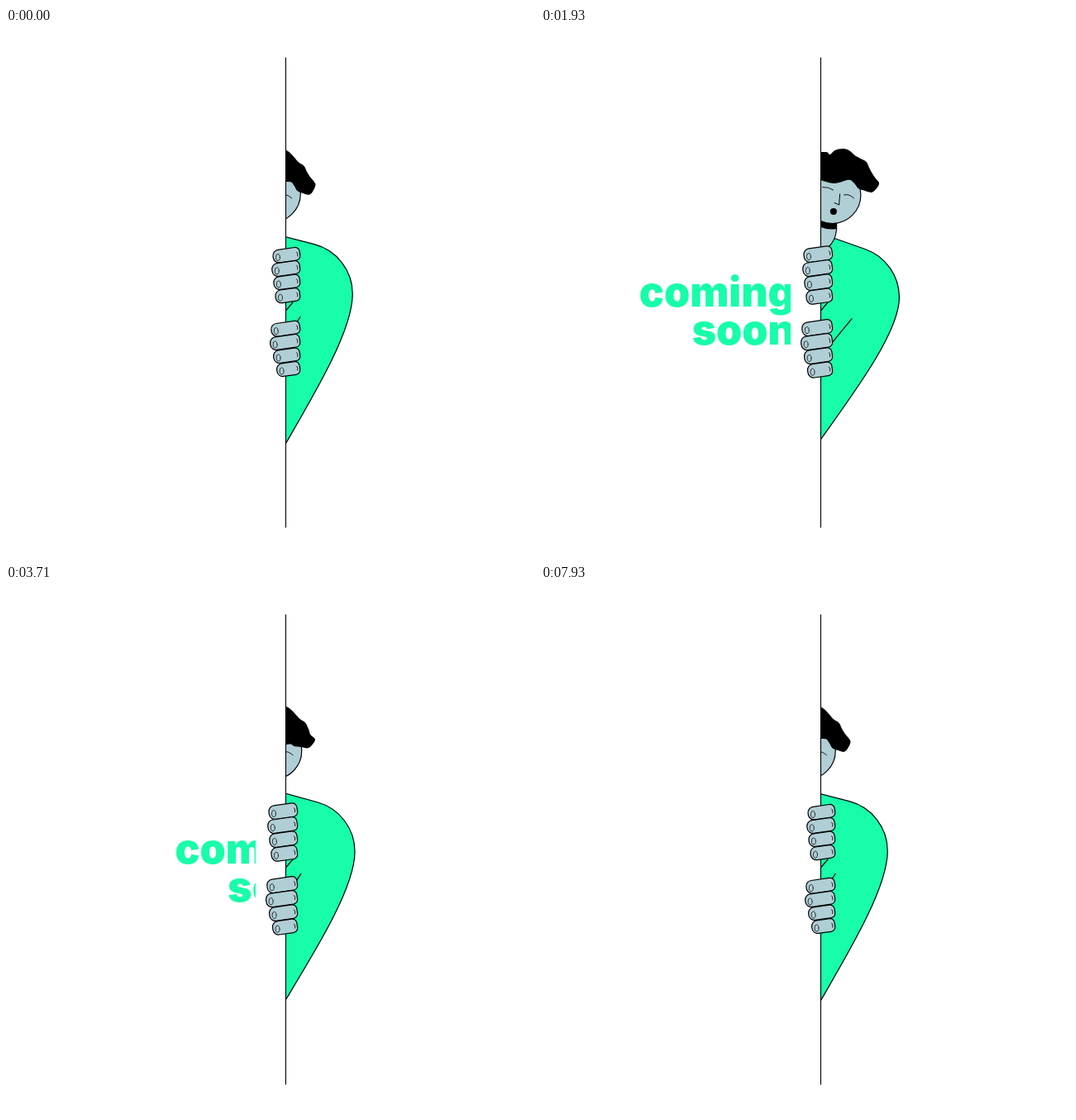
These frames come from a looping animation (640 by 640 pixels, 8 s). An HTML page with a canvas:

```html
<!DOCTYPE html>
<html lang="en">
<head>
<meta charset="utf-8">
<title>coming soon</title>
<style>
html, body { margin: 0; width: 100%; height: 100%; overflow: hidden; background: #fff; }
canvas { display: block; width: 640px; height: 640px; }
</style>
</head>
<body>
<canvas id="stage" width="640" height="640"></canvas>
<script>
const ctx = document.getElementById('stage').getContext('2d');
const LOOP = 8000, STEPS = 112, WALL = 338.5;
const GREEN = '#17fda9', SKIN = '#b0ced5', INK = '#000';

const lerp = (a, b, u) => a + (b - a) * u;

// Sine ease from 0 to 1 between two times
function ease(t, from, to) {
  const u = Math.min(1, Math.max(0, (t - from) / (to - from)));
  return (1 - Math.cos(Math.PI * u)) / 2;
}

// Rises at the start of the loop, falls between two later times
const pulse = (t, from, to) => ease(t, 0, 1245) * (1 - ease(t, from, to));

// Smooth curve through points
function spline(pts) {
  const at = i => pts[Math.min(pts.length - 1, Math.max(0, i))];
  ctx.moveTo(...pts[0]);
  for (let i = 0; i < pts.length - 1; i++) {
    const [p, a, b, n] = [at(i - 1), at(i), at(i + 1), at(i + 2)];
    ctx.bezierCurveTo(a[0] + (b[0] - p[0]) / 6, a[1] + (b[1] - p[1]) / 6,
      b[0] - (n[0] - a[0]) / 6, b[1] - (n[1] - a[1]) / 6, b[0], b[1]);
  }
}

function fill(color) {
  ctx.fillStyle = color;
  ctx.fill();
}

function stroke(width = 1.2) {
  ctx.lineWidth = width;
  ctx.strokeStyle = INK;
  ctx.stroke();
}

function line(x1, y1, x2, y2, width) {
  ctx.beginPath();
  ctx.moveTo(x1, y1);
  ctx.lineTo(x2, y2);
  stroke(width);
}

function curve(x1, y1, cx, cy, x2, y2, width) {
  ctx.beginPath();
  ctx.moveTo(x1, y1);
  ctx.quadraticCurveTo(cx, cy, x2, y2);
  stroke(width);
}

function drawBody(b) {
  const side = lerp(419.3, 434.8, b), hem = lerp(503, 497.5, b);
  const outline = () => {
    ctx.beginPath();
    ctx.moveTo(lerp(332, 355, b), lerp(251, 254, b));
    ctx.arcTo(side, lerp(273.8, 282.8, b), side, 400, 62);
    ctx.bezierCurveTo(side, lerp(365, 367, b), lerp(376, 383, b), lerp(438, 436, b), 338.3, hem);
  };
  outline();
  ctx.lineTo(330, hem);
  ctx.lineTo(330, 260);
  fill(GREEN);
  outline();
  stroke();

  const fold = b * b;
  line(350, lerp(359, 388, fold), lerp(356, 380, fold), lerp(349.5, 352, fold));
  line(338, 342.5, 347, 332);
}

// Loose lock of hair: the fringe drops while the tip lifts, later the tip sags
function lockAt(t, back) {
  const drop = ease(t, 1250, 3300) * (1 - ease(t, 4300, LOOP));
  const sag = ease(t, 4600, 6700) * (1 - ease(t, 6700, LOOP));
  const tip = [[404, 181], [409, 188], [406, 195], [400, 200],
    [391, 197.5], [384, 194], [379.5, 187], [373, 182]];
  return tip.map(([x, y], i) => {
    const v = i / (tip.length - 1), bow = Math.sin(Math.PI * v);
    return [
      x + back * (5 * v - 3) - drop * (2 + 5 * v * v) - 2 * sag,
      y + back * 4 * v + drop * (7 * v ** 3 - 5 * bow) + sag * (1 + 5 * bow)
    ];
  });
}

function drawHead(t, p) {
  const back = 1 - p;
  ctx.save();
  ctx.translate(0.6 - 30.6 * back, 0);

  // Neck and the shadow on it
  ctx.beginPath();
  ctx.moveTo(325, 225);
  ctx.lineTo(357, 225);
  ctx.lineTo(357, 243);
  ctx.quadraticCurveTo(356, 258, 346, 266);
  ctx.lineTo(325, 280);
  fill(SKIN);
  stroke();
  ctx.beginPath();
  ctx.moveTo(325, 230);
  ctx.lineTo(357, 230);
  ctx.lineTo(357, 243);
  ctx.quadraticCurveTo(346, 245, 336, 240);
  fill(INK);

  ctx.beginPath();
  ctx.arc(351.8, 202 - 1.5 * back, 34.5, 0, Math.PI * 2);
  fill(SKIN);
  stroke();

  // Features and hair shift a little further than the face
  ctx.translate(-2.4 * back, 0);
  curve(340, 192.5, 347, 192, 353, 196, 0.9);
  curve(366, 202, 372, 200, 378, 206, 0.9);
  ctx.beginPath();
  ctx.moveTo(361, 201);
  ctx.lineTo(360, 214);
  ctx.lineTo(354.5, 211.5);
  stroke(1);
  ctx.beginPath();
  ctx.arc(353.3, 222, lerp(5.2, 3, ease(t, 1250, 2570)), 0, Math.PI * 2);
  fill(INK);

  ctx.beginPath();
  spline([[325, 151], [344, 150], [349, 153], [355, 148], [364, 146], [372, 148], [379, 154],
    [386, 158 + 4 * back], [393, 162 + 5 * back], [398 - back, 172 + 3 * back],
    ...lockAt(t, back), [354, 188], [335, 183.5], [325, 184]]);
  fill(INK);
  ctx.restore();
}

function finger(left, right, y, h) {
  const w = right - left;
  ctx.save();
  ctx.translate((left + right) / 2, y);
  ctx.rotate(-0.14);
  ctx.beginPath();
  ctx.roundRect(-w / 2, -h / 2, w, h, [7, 5.5, 5.5, 7]);
  fill(SKIN);
  stroke();
  ctx.beginPath();
  ctx.ellipse(-w / 2 + 5.7, 1.2, 2.5, 4, 0.1, 0, Math.PI * 2);
  stroke(0.7);
  curve(w / 2 - 3.4, -2, w / 2 - 2, 0, w / 2 - 3, 3, 0.8);
  ctx.restore();
}

// g is the grip; each finger below the second is shorter by taper
function drawHand(g, x, y, taper) {
  for (let i = 0; i < 4; i++) {
    const inset = i ? taper * (i - 1) : 1.2;
    finger(x - 5 * g + inset, 355.6 - 3.2 * g, y - 1.1 * g + lerp(16.3, 17, g) * i, lerp(15.7, 16.6, g));
  }
}

function drawText(shift) {
  ctx.save();
  ctx.beginPath();
  ctx.rect(0, 0, 302, 640);
  ctx.clip();
  ctx.font = '900 50px Inter, "Open Sans", sans-serif';
  ctx.textAlign = 'right';
  ctx.fillStyle = GREEN;
  ctx.fillText('coming', 298.5 + shift, 336.5);
  ctx.fillText('soon', 298.5 + shift, 383);
  ctx.restore();
}

function draw(now) {
  const step = Math.floor(((now % LOOP) + 4) * STEPS / LOOP) % STEPS;
  const t = step * LOOP / STEPS;

  ctx.fillStyle = '#fff';
  ctx.fillRect(0, 0, 640, 640);
  drawText(205 * (1 - pulse(t, 1250, 6450)));

  ctx.save();
  ctx.beginPath();
  ctx.rect(WALL, 0, 640, 640);
  ctx.clip();
  drawBody(pulse(t, 1300, 4640));
  drawHead(t, pulse(t, 1896, 4015));
  ctx.restore();

  line(WALL, 36, WALL, 604, 1.1);
  const grip = pulse(t, 3900, 6000);
  drawHand(grip, 321.8, 274.8, 2.1);
  drawHand(grip, 319.6, 363.8, 4);
}

function tick() {
  draw(performance.now());
  requestAnimationFrame(tick);
}
ctx.lineJoin = ctx.lineCap = 'round';
tick();
</script>
</body>
</html>
```
